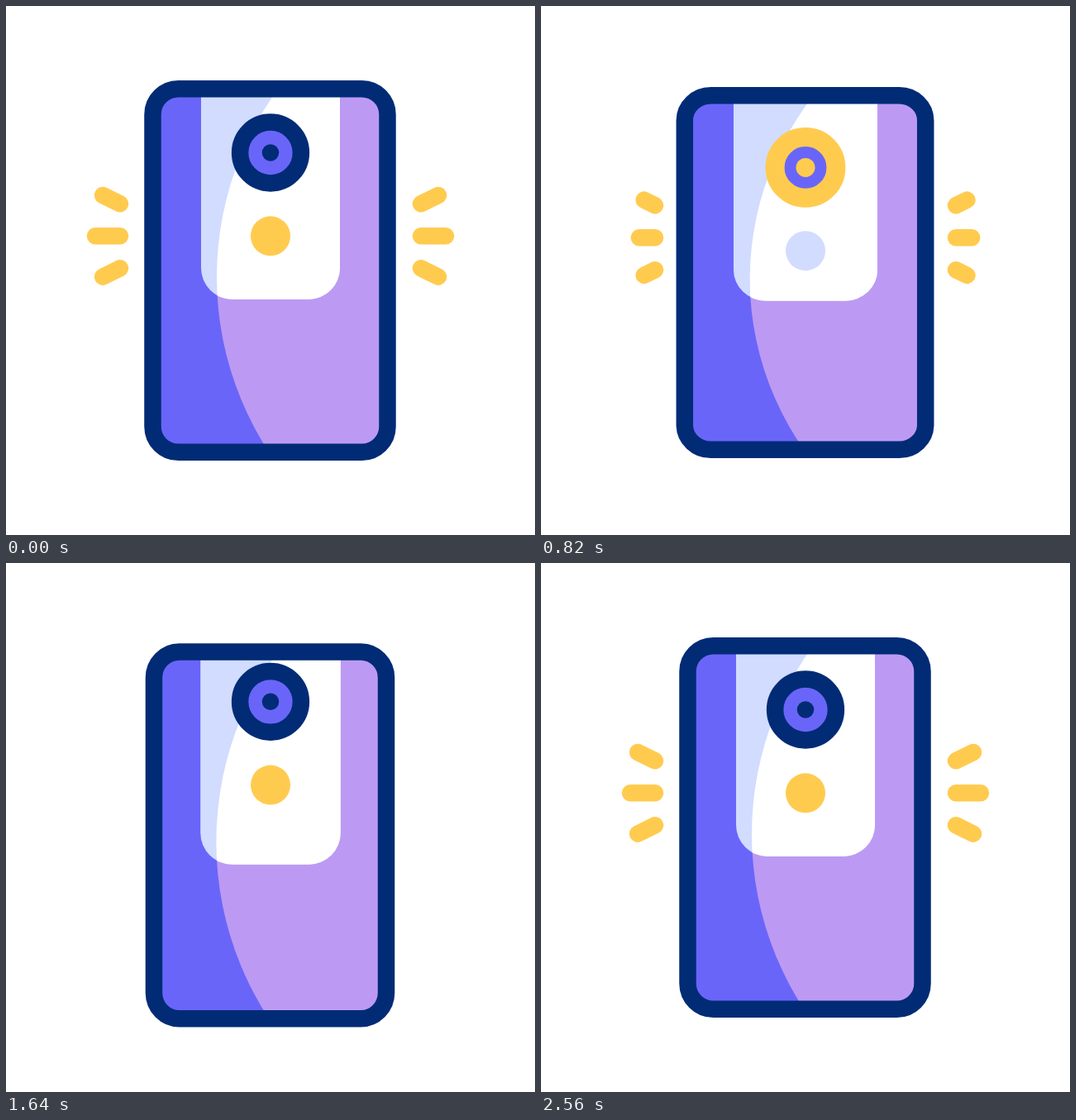
Animation of 640 by 640 pixels, one loop 2580 ms. Source, as an HTML page:

```html
<!DOCTYPE html>
<html lang="en">
<head>
<meta charset="utf-8">
<title>Phone camera flash</title>
<style>
  html, body { margin: 0; width: 100%; height: 100%; overflow: hidden; background: #fff; }
  svg { display: block; width: 100vw; height: 100vh; }
  .ray { stroke: #ffcb4f; stroke-width: 20.5; stroke-linecap: round; }
</style>
</head>
<body>
<svg viewBox="0 0 640 640">
  <defs>
    <clipPath id="inside"><rect class="body"/></clipPath>
    <clipPath id="shine"><circle cx="322" cy="8" r="387"/></clipPath>
    <rect id="panel" x="-84" y="-260" width="168" height="295" rx="38"/>
  </defs>

  <g id="rays">
    <g id="side">
      <line class="ray"/><line class="ray"/><line class="ray"/>
    </g>
    <use href="#side" transform="translate(640 0) scale(-1 1)"/>
  </g>

  <g clip-path="url(#inside)">
    <g id="fill">
      <rect x="-200" y="-300" width="400" height="600" fill="#6a65f9"/>
      <circle cx="322" cy="8" r="387" fill="#bc9af3"/>
      <use href="#panel" fill="#d1dcfe"/>
      <use href="#panel" fill="#fff" clip-path="url(#shine)"/>
    </g>
  </g>
  <rect class="body" fill="none" stroke="#022b76" stroke-width="20.5"/>

  <g id="camera">
    <circle id="lens" cx="320" cy="177.5" r="36.9" fill="#6a65f9"/>
    <circle id="pupil" cx="320" cy="177.5"/>
    <circle id="light" cx="320" cy="278.3" r="24"/>
  </g>
</svg>

<script>
const LOOP = 2580, NAVY = '#022b76', YELLOW = '#ffcb4f', PALE = '#d1dcfe';
const $ = id => document.getElementById(id);
const set = (el, attrs) => { for (const k in attrs) el.setAttribute(k, attrs[k]); };

const easeIn = u => u * u;
const easeOut = u => 1 - (1 - u) ** 2;
const easeInOut = u => u * u * (3 - 2 * u);
const span = (t, from, to) => Math.min(1, Math.max(0, (t - from) / (to - from)));

// Crouch, leap, land, hop once more and come to rest.
function jump(crouch, leap, hop, { launch = 650, peak = 1350, land = 1710, rebound = 1760, rise = easeInOut } = {}) {
  return t =>
    crouch * easeInOut(span(t, 200, 525))
    + (leap - crouch) * rise(span(t, launch, peak))
    + (crouch - leap) * easeIn(span(t, peak, land))
    + (hop - crouch) * rise(span(t, rebound, 2120))
    - hop * easeInOut(span(t, 2120, 2400));
}

const bodyY = jump(41, -49, -25.6, { rise: easeOut });
const raysY = jump(41, -37, -20, { launch: 600, rise: easeOut });
const cameraY = jump(41, -66, -30, { launch: 610, peak: 1310, land: 1765, rebound: 1770 });
const stretch = jump(-.055, .09, .03, { launch: 600, land: 1740, rebound: 1740 });
const fillStretch = jump(-.055, .075, .025);

const bodies = document.querySelectorAll('.body');
const rays = document.querySelectorAll('.ray');

function drawRays(t) {
  const shown = t < 400 || (t >= 740 && t < 1480) || t >= 2140;
  set($('rays'), {
    visibility: shown ? 'visible' : 'hidden',
    transform: `translate(0 ${raysY(t)})`
  });
  let from = 0, to = 1;
  if (t < 400) {
    from = easeInOut(span(t, 200, 370));
  } else if (t < 1480) {
    from = easeInOut(span(t, 1300, 1460));
    to = .64 * easeOut(span(t, 740, 800)) + .36 * easeIn(span(t, 800, 1290));
  } else {
    to = 1 - (1 - span(t, 2140, LOOP)) ** 3;
  }
  rays.forEach((ray, i) => {
    const k = i - 1, dx = k ? -21 : -30, dy = 10.3 * k, y = 278.3 + 39 * k;
    set(ray, {
      x1: 138 + dx * from, y1: y + dy * from,
      x2: 138 + dx * to, y2: y + dy * to
    });
  });
}

function drawBody(t) {
  const cy = 320 + bodyY(t), s = stretch(t);
  const sx = 1 - 1.05 * s, sy = 1 + s;
  const w = 284 * sx, h = 439.5 * sy;
  bodies.forEach(b => set(b, {
    x: 319.5 - w / 2, y: cy - h / 2, width: w, height: h, rx: 31 * sx, ry: 31 * sy
  }));
  set($('fill'), { transform: `translate(320 ${cy}) scale(${1 - fillStretch(t)} ${sy})` });
}

function drawCamera(t) {
  const lit = t >= 740 && t < 1400;
  const color = lit ? YELLOW : NAVY, line = lit ? 23 : 20.5;
  set($('camera'), { transform: `translate(0 ${cameraY(t)})` });
  set($('lens'), { stroke: color, 'stroke-width': line });
  set($('pupil'), { fill: color, r: line / 2 });
  set($('light'), { fill: lit && t < 960 ? PALE : YELLOW });
}

let start;
function frame(now) {
  start ??= now;
  const t = (now - start) % LOOP;
  drawRays(t);
  drawBody(t);
  drawCamera(t);
  requestAnimationFrame(frame);
}
requestAnimationFrame(frame);
</script>
</body>
</html>
```
